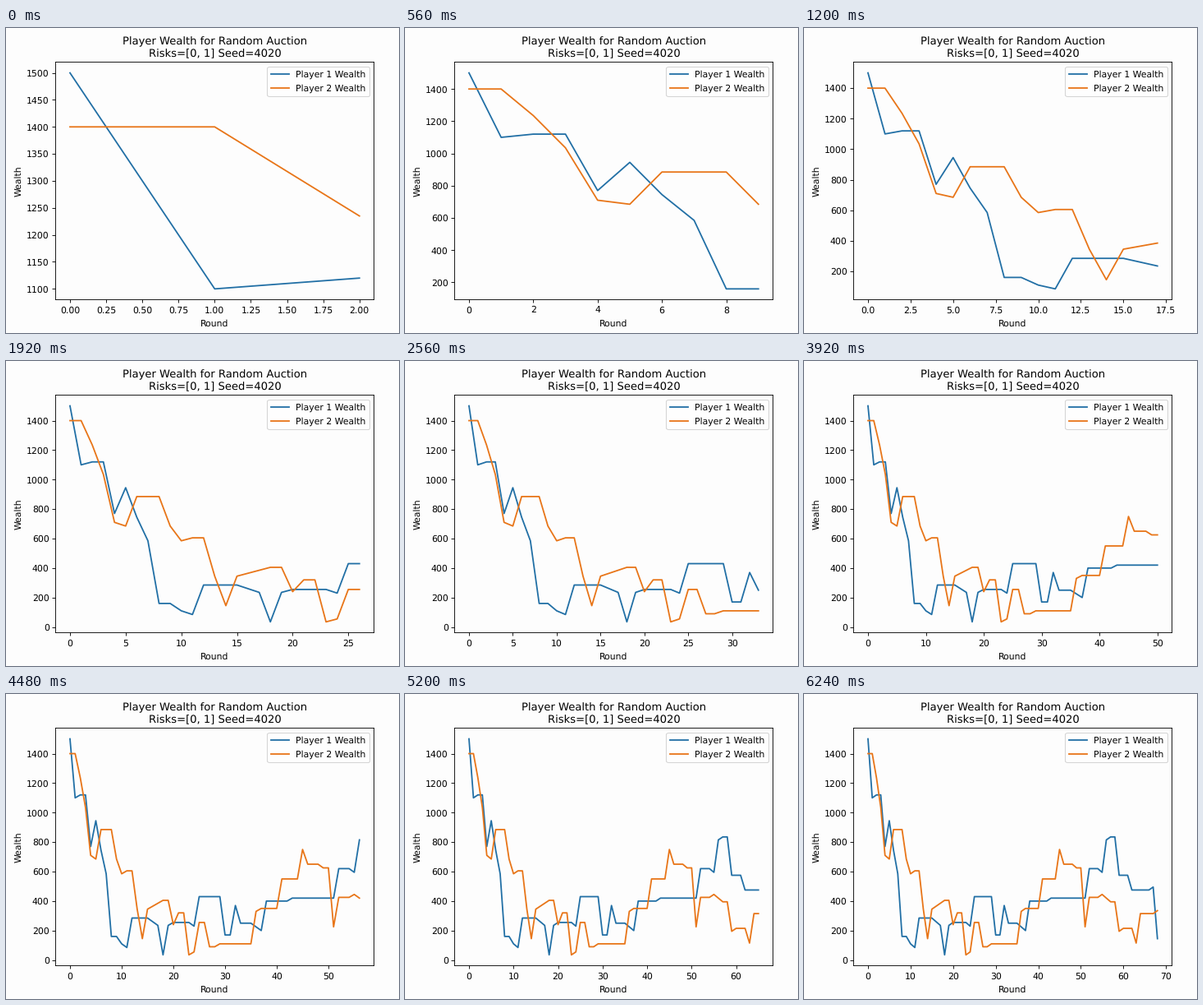
These frames come from a looping animation (479 px wide and 371 px high, 6.32 s). A matplotlib script:

```python
import numpy as np
import matplotlib.pyplot as plt
from matplotlib.animation import FuncAnimation

W, H, DPI = 479, 371, 78.4
FRAMES, STEP_MS = 79, 80
LEFT, RIGHT, TOP, BOTTOM = 60.35, 448.4, 41.45, 330.47
PAPER = "#fdfdfd"
LAST = 68


def wealth(start, moves):
    """Running balance; moves maps an amount to the rounds it is booked in."""
    change = np.zeros(LAST + 1)
    change[0] = start
    for amount, rounds in moves.items():
        change[list(rounds)] += amount
    return change.cumsum()


# Prizes pay 200, small trades move about 20, the rest are winning bids
p1 = wealth(1500, {
    200: (5, 12, 19, 25, 32, 38, 52, 56),
    20: (2, 20, 43, 56, 57, 67),
    -25: (5, 8, 11, 16, 17, 24, 36, 37, 55),
    -50: (10,), -100: (62,), -120: (33,), -160: (7,),
    -200: (6, 18), -260: (30, 59), -350: (4, 68), -400: (1, 8),
})
p2 = wealth(1400, {
    200: (6, 15, 25, 36, 41, 45, 52, 64),
    20: (11, 16, 17, 18, 24, 29, 36, 37, 55, 60, 68),
    80: (21,),
    -25: (5, 49, 56, 57),
    -100: (10, 46, 63), -165: (2, 20, 27), -200: (3, 9, 14, 59),
    -260: (13,), -285: (23,), -325: (4,), -400: (51,),
})

plt.rcParams["text.hinting"] = "none"
fig = plt.figure(figsize=((W + 0.01) / DPI, (H + 0.01) / DPI), dpi=DPI,
                 facecolor=PAPER)
ax = fig.add_axes([LEFT / W, 1 - BOTTOM / H,
                   (RIGHT - LEFT) / W, (BOTTOM - TOP) / H], facecolor=PAPER)
ax.set_title("Player Wealth for Random Auction\nRisks=[0, 1] Seed=4020")
ax.set_xlabel("Round", labelpad=5.4)
ax.set_ylabel("Wealth")
line1, = ax.plot([], [], color="#216fa5", lw=1.65, label="Player 1 Wealth")
line2, = ax.plot([], [], color="#e87518", lw=1.65, label="Player 2 Wealth")
ax.legend(loc="upper right", labelspacing=0.6)


def padded(lo, hi):
    pad = 0.05 * (hi - lo)
    return lo - pad, hi + pad


def update(frame):
    # 24 rounds pass in every 25 steps, then the finished game holds
    n = min(LAST, 2 + 24 * (frame + 1) // 25)
    a, b = p1[:n + 1], p2[:n + 1]
    line1.set_data(range(n + 1), a)
    line2.set_data(range(n + 1), b)
    ax.set_xlim(*padded(0, n))
    ax.set_ylim(*padded(min(a.min(), b.min()), max(a.max(), b.max())))
    return line1, line2


anim = FuncAnimation(fig, update, frames=FRAMES, interval=STEP_MS,
                     init_func=lambda: update(0), repeat=True,
                     repeat_delay=0, blit=False)
plt.show()
```
